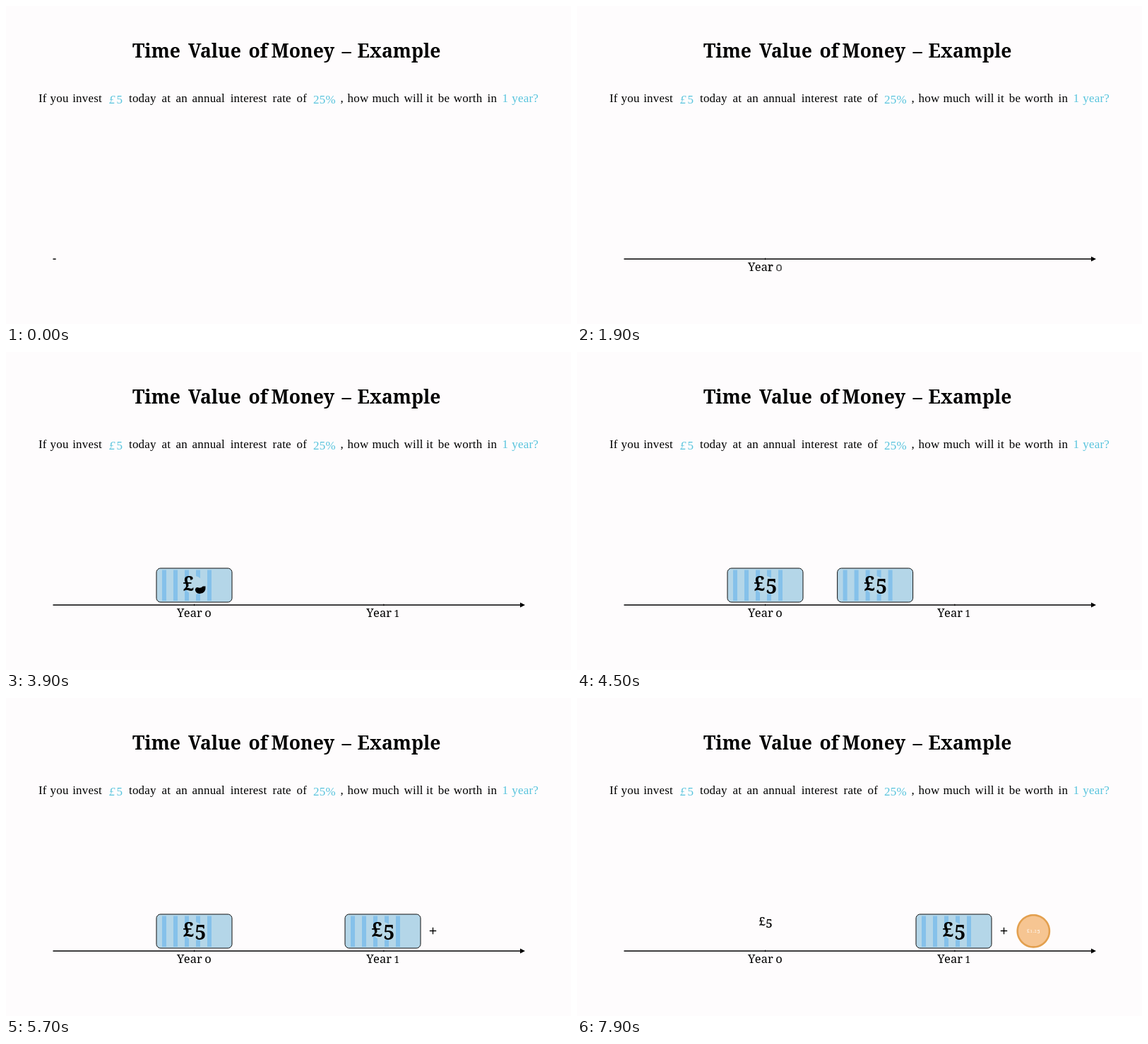
Write an HTML page that moves like this. It is 800 by 450 pixels and loops after 8000 ms.

```html
<!DOCTYPE html>
<html lang="en">
<head>
<meta charset="utf-8">
<title>Time Value of Money</title>
<style>
  html, body { margin: 0; width: 100%; height: 100%; overflow: hidden; background: #fefcfd; }
  svg { display: block; width: 100vw; height: 100vh; }
  text { font-family: "Noto Serif", "Liberation Serif", serif; }
  .title { font-size: 26.5px; font-weight: bold; }
  .question { font-family: "Liberation Serif", "Times New Roman", serif; font-size: 17px; letter-spacing: .2px; }
  .blue { fill: #58c4dd; }
</style>
</head>
<body>
<svg viewBox="0 0 800 450" xmlns="http://www.w3.org/2000/svg">
  <text class="title" id="title" y="73"></text>
  <text class="question" id="question" y="136"></text>
  <g id="scene"></g>
</svg>
<script>
const LOOP = 8000, STEP = 100, LEAD = 33;
const NOTE_X = 266.5, NEXT_X = 533.5;
const NOTE_FILL = [180, 214, 232], STRIPE_FILL = [133, 193, 234];

const titleWords = [
  [179, 'Time'], [258, 'Value'], [343.5, 'of'], [375.5, 'Money'], [475.5, '–'], [497.5, 'Example'],
];
const words = [
  [46, 'If'], [62.5, 'you'], [94.2, 'invest'],
  [174, 'today'], [220.4, 'at'], [240.6, 'an'], [263.5, 'annual'],
  [317.7, 'interest'], [377.6, 'rate'], [411.6, 'of'],
  [473.5, ','], [483.5, 'how'], [518.5, 'much'], [563.5, 'will'], [595, 'it'],
  [611.7, 'be'], [633.8, 'worth'], [681.6, 'in'],
];
const answers = [
  [146, '£', 138, 'italic'], [156.5, '5', 138], [435, '25%', 138],
  [702.5, '1', 136], [716.3, 'year?', 136],
];
const placeWords = list => list.map(([x, word]) => `<tspan x="${x}">${word}</tspan>`).join(' ');
document.getElementById('title').innerHTML = placeWords(titleWords);
document.getElementById('question').innerHTML = placeWords(words) +
  answers.map(([x, word, y, style = 'normal']) =>
    `<tspan class="blue" x="${x}" y="${y}" font-style="${style}">${word}</tspan>`).join(' ');

const clamp = v => Math.max(0, Math.min(1, v));
const lerp = (a, b, s) => a + (b - a) * s;
const sigmoid = v => 1 / (1 + Math.exp(-v));
const smooth = u => {
  const edge = sigmoid(-5);
  return clamp((sigmoid(10 * (clamp(u) - .5)) - edge) / (1 - 2 * edge));
};
// Progress of the one-second animation with the given index.
const phase = (t, index) => clamp((t + LEAD) / 1000 - index);
// Progress of one of n parts drawn one after another.
const part = (u, n, i) => smooth(u * n - i);
const mix = (rgb, s) => `rgb(${rgb.map(v => Math.round(lerp(v, 0, s)))})`;

const glyph = (char, x, y, size, extra = '') =>
  `<text x="${x}" y="${y}" font-size="${size}" ${extra}>${char}</text>`;

// Leading portion s of a closed outline, filled across its chord.
function outline(points, s, attrs) {
  if (s <= 0) return '';
  const closed = [...points, points[0]];
  const end = s * points.length, k = Math.min(points.length - 1, Math.floor(end));
  const [a, b] = [closed[k], closed[k + 1]];
  const shown = closed.slice(0, k + 1);
  shown.push([lerp(a[0], b[0], end - k), lerp(a[1], b[1], end - k)]);
  return `<polyline points="${shown.map(p => p.map(v => v.toFixed(2)).join()).join(' ')}" ${attrs}/>`;
}

function circlePoints(cx, cy, r, n = 64) {
  return Array.from({ length: n }, (_, i) => {
    const a = -2 * Math.PI * i / n;
    return [cx + r * Math.cos(a), cy + r * Math.sin(a)];
  });
}

function roundedPoints(x, y, w, h, r) {
  const points = [];
  const corners = [[x + w - r, y + r], [x + r, y + r], [x + r, y + h - r], [x + w - r, y + h - r]];
  corners.forEach(([cx, cy], c) => {
    for (let i = 0; i <= 6; i++) {
      const a = -(c + i / 6) * Math.PI / 2;
      points.push([cx + r * Math.cos(a), cy + r * Math.sin(a)]);
    }
  });
  return points;
}

const noteBox = cx => [cx - 53.5, 306, 107, 48];
const stripeX = (cx, i) => cx - 45.5 + 16 * i;

function axis(u) {
  const length = 662 * part(u, 2, 0);
  return `<path d="M66.5 358.1h${length}" stroke="#000" stroke-width="1.5"/>` +
    outline([[735, 358.1], [728, 354.6], [728, 361.6]], part(u, 2, 1), '');
}

function yearLabel(t, start, x, digit, digitSize) {
  if (t < start) return '';
  const u = clamp((t - start) / 810);
  const letters = [['Y', 0], ['e', 9.8], ['a', 18.8], ['r', 28], [digit, 39.3, digitSize]];
  const tick = `<path d="M${x + 24.6} 356.6v2.6" stroke="#000" stroke-width="1"/>`;
  return tick + letters.map(([char, dx, size = 16.5], i) => {
    const a = clamp(u * 1.8 - .2 * i);
    if (!a) return '';
    const border = a < 1 ? `stroke="#000" stroke-width=".3" stroke-dasharray="${100 * a} 100"` : '';
    return glyph(char, x + dx, 375.2, size, `fill-opacity="${clamp(2 * a - 1)}" ${border}`);
  }).join('');
}

function note(cx, u = 1) {
  const n = 9, bold = 'font-weight="bold"';
  let out = outline(roundedPoints(...noteBox(cx), 6), part(u, n, 0),
    `fill="${mix(NOTE_FILL, 0)}" stroke="#111" stroke-width="1"`);
  for (let i = 0; i < 5; i++) {
    out += `<rect x="${stripeX(cx, i)}" y="308.5" width="6" height="${43.5 * part(u, n, i + 1)}" fill="${mix(STRIPE_FILL, 0)}"/>`;
  }
  out += outline(circlePoints(cx, 330, 13), part(u, n, 6), 'fill="#b8d8e8"');
  if (part(u, n, 7) > .3) out += glyph('£', cx - 16, 338, 28, bold);
  const five = part(u, n, 8);
  if (five > .6) {
    out += glyph('5', cx + 1, 341.8, 28, bold);
  } else if (five > .05) {
    const x = cx + 1.3;
    out += `<path d="M${x} 336q1-4 5-2.5 3 1 6-2h3.7q1 10-8.2 10.6-6.5-.6-6.5-6.1z"/>`;
  }
  return out;
}

// The banknote collapses into a small price label.
function collapse(cx, s) {
  const fade = 1 - clamp((s - .6) / .36);
  const poundBox = [257.5, 310, 9, 12], fiveBox = [268, 313, 8, 12];
  const piece = (from, to, rgb, attrs = '') => {
    const [x, y, w, h] = from.map((v, i) => lerp(v, to[i], s));
    return `<rect x="${x}" y="${y}" width="${w}" height="${h}" rx="${lerp(attrs ? 6 : 0, 2, s)}" fill="${mix(rgb, s)}" ${attrs}/>`;
  };
  let shapes = piece(noteBox(cx), poundBox, NOTE_FILL, 'stroke="#111"');
  for (let i = 0; i < 5; i++) {
    shapes += piece([stripeX(cx, i), 308.5, 6, 43.5], i < 3 ? poundBox : fiveBox, STRIPE_FILL);
  }
  const size = lerp(28, 17, s);
  const weight = s < .9 ? 'font-weight="bold"' : 'stroke="#000" stroke-width=".25"';
  return `<g opacity="${fade}">${shapes}</g>` +
    glyph('£', lerp(cx - 16, 257.2, s), lerp(338, 321.5, s), size, weight) +
    glyph('5', lerp(cx + 1, 267.2, s), lerp(341.8, 324.5, s), size, weight);
}

function plus(s) {
  const x = 604.5, y = 329.5, a = 4.7, b = .65;
  return outline([[b, -a], [b, -b], [a, -b], [a, b], [b, b], [b, a], [-b, a], [-b, b],
    [-a, b], [-a, -b], [-b, -b], [-b, -a]].map(([dx, dy]) => [x + dx, y + dy]), s, '');
}

function coin(u) {
  const digits = [['£', 636.8, 332.2], ['1', 641.6, 332.2, 5.8], ['.', 645.2, 332.2],
    ['2', 647.4, 332.2, 5.8], ['5', 651.4, 333.4]];
  return outline(circlePoints(646.3, 329.8, 22.6), part(u, 6, 0),
      'fill="#f6c592" stroke="#e3a04f" stroke-width="2.6"') +
    digits.map(([char, x, y, size = 7.4], i) =>
      glyph(char, x, y, size, `fill="#fff" opacity="${part(u, 6, i + 1)}"`)).join('');
}

const scene = document.getElementById('scene');
function draw(t) {
  const shrink = smooth(phase(t, 7)), move = phase(t, 4);
  scene.innerHTML = axis(phase(t, 0)) +
    yearLabel(t, 1190, 242, 'o') +
    yearLabel(t, 2190, 510.3, '1', 13.5) +
    (shrink > 0 ? collapse(NOTE_X, shrink) : note(NOTE_X, phase(t, 3))) +
    (move > 0 ? note(lerp(NOTE_X, NEXT_X, smooth(move))) : '') +
    plus(smooth((t + LEAD - 5000) / 800)) +
    coin(phase(t, 6));
}

const start = performance.now();
function tick() {
  const t = (performance.now() - start) % LOOP;
  draw(Math.floor(t / STEP) * STEP);
  requestAnimationFrame(tick);
}
tick();
</script>
</body>
</html>
```
